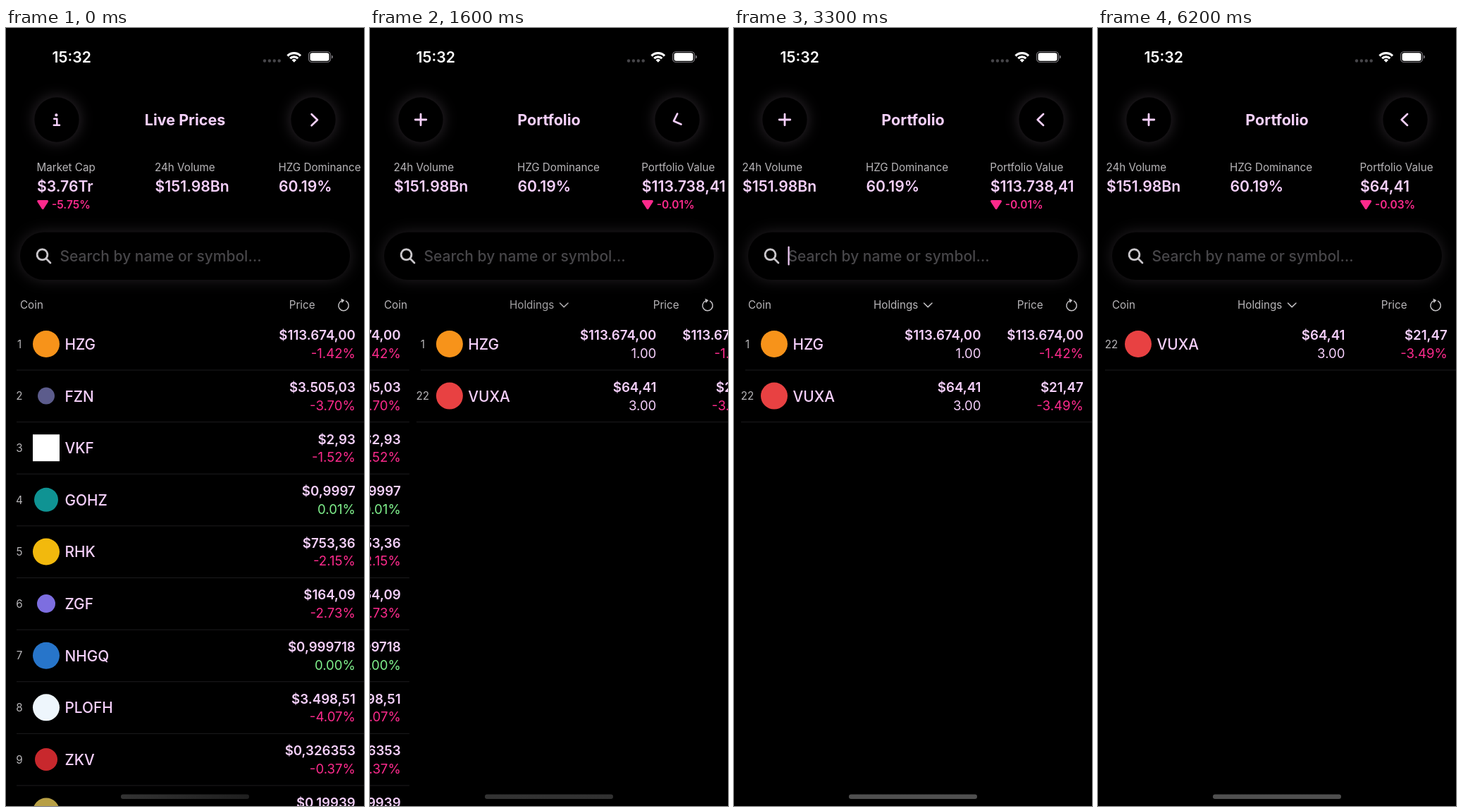
Recreate the animation shown at these times as an HTML page. Size 508x1103 px, loop 6.5 s.

```html
<!DOCTYPE html>
<html lang="en">
<head>
<meta charset="utf-8">
<title>Live prices</title>
<style>
  html, body { margin: 0; width: 100%; height: 100%; overflow: hidden; background: #000; }
  svg { display: block; width: 508px; height: 1103px; }
  text { font-family: Inter, "Liberation Sans", sans-serif; fill: #f6d0fc; white-space: pre; }
  .cap { font-size: 15.2px; fill: #b8b6b9; }
  .val { font-size: 21.2px; font-weight: 600; }
  .time { fill: #fff; }
  .chg { font-size: 15.5px; font-weight: 600; }
  .title { font-size: 21.5px; font-weight: 700; text-anchor: middle; }
  .field { font-size: 21px; font-weight: 500; }
  .name { font-size: 20.8px; font-weight: 500; }
  .price { font-size: 18.7px; font-weight: 600; text-anchor: end; }
  .pct { font-size: 18.6px; text-anchor: end; }
  .down { fill: #fd2a8c; }
  .up { fill: #80f28d; }
  .rank { text-anchor: middle; }
  .line { fill: none; stroke: #f6d0fc; stroke-linecap: round; stroke-linejoin: round; }
  .thin { stroke: #c4c2c5; stroke-width: 1.5; }
  .glow { fill: #000; filter: drop-shadow(0 0 10px rgba(255, 225, 255, .19)); }
  .bar { filter: drop-shadow(0 0 10px rgba(255, 225, 255, .14)); }
</style>
</head>
<body>
<svg viewBox="0 0 508 1103" id="stage"></svg>
<script>
const W = 508, ROW = 73.62, LOOP = 6500;

const text = (cls, x, y, s, id = '') => `<text class="${cls}" x="${x}" y="${y}" id="${id}">${s}</text>`;
const disc = (x, y, r, fill) => `<circle cx="${x}" cy="${y}" r="${r}" fill="${fill}"/>`;
const line = (d, w, id = '') => `<path class="line" d="${d}" stroke-width="${w}" id="${id}"/>`;

const tone = pct => pct[0] === '-' ? 'down' : 'up';

const icon = (shape, size, color) => shape === 'square'
  ? `<rect x="${57 - size}" y="${448 - size}" width="${size * 2}" height="${size * 2}" fill="${color}"/>`
  : disc(57, 448, size, color);

function row(i, [rank, name, price, pct, color, size = 19, shape], holding) {
  const left = !holding ? 15 : rank > 9 ? 10 : 16;
  return `<g transform="translate(0 ${i * ROW})">
    ${text('cap rank', 19, 453.7, rank)}${icon(shape, size, color)}
    ${text('name', 83.5, 456, name)}
    ${holding ? text('price', 350.5, 442.3, holding[0]) + text('pct', 350.5, 468, holding[1]) : ''}
    ${text('price', 495.8, 442.3, price)}${text('pct ' + tone(pct), 495.8, 468, pct)}
    <path d="M${left} 485H508" stroke="#1d1c1e"/></g>`;
}

function stat(x, label, value, change, id = '') {
  const tri = `<path d="M${x + 1.8} 245.6h12.8l-6.4 10z" fill="#fd2a8c" stroke="#fd2a8c" stroke-width="3" stroke-linejoin="round"/>`;
  return `<g id="${id}">${text('cap', x - .5, 202.5, label)}${text('val', x, 231.7, value)}
    ${change ? tri + text('chg down', x + 21, 256, change) : ''}</g>`;
}

const coins = [
  [1, 'HZG', '$113.674,00', '-1.42%', '#f7931a'],
  [2, 'FZN', '$3.505,03', '-3.70%', '#5c5c8c', 12],
  [3, 'VKF', '$2,93', '-1.52%', '#ffffff', 19, 'square'],
  [4, 'GOHZ', '$0,9997', '0.01%', '#0f9393', 17],
  [5, 'RHK', '$753,36', '-2.15%', '#f2b90d'],
  [6, 'ZGF', '$164,09', '-2.73%', '#7d6ee0', 13],
  [7, 'NHGQ', '$0,999718', '0.00%', '#2775ca'],
  [8, 'PLOFH', '$3.498,51', '-4.07%', '#eef6fc'],
  [9, 'ZKV', '$0,326353', '-0.37%', '#c8282d', 16],
  [10, 'QOHV', '$0,19939', '-4.20%', '#b79f45']
];
const second = [22, 'VUXA', '$21,47', '-3.49%', '#e84142'];

const statusBar = `${text('val time', 65.5, 49, '15:32')}
  ${[0, 1, 2, 3].map(i => disc(367 + i * 6.9, 46.5, 2.2, '#47464a')).join('')}
  <g fill="none" stroke="#fff" stroke-width="3.2">
    <path d="M399.5 39.5A13.2 13.2 0 0 1 418 39.5M403.2 43.2A8 8 0 0 1 414.3 43.2"/></g>
  <path d="M408.8 48.8l-3.2-3.4a4.6 4.6 0 0 1 6.4 0z" fill="#fff"/>
  <rect x="429.5" y="33.5" width="31" height="15" rx="4.8" fill="none" stroke="#77757a" stroke-width="1.2"/>
  <rect x="431.5" y="35.3" width="27" height="11.4" rx="3.2" fill="#fff"/>
  <path d="M462 38.5q2 .6 2 2.5t-2 2.5z" fill="#77757a"/>`;

const header = `<circle id="ring" cx="72" cy="130" fill="none" stroke="#fff"/>
  <circle class="glow" cx="72" cy="130" r="31.7"/><circle class="glow" cx="436" cy="130" r="31.7"/>
  <g id="info">${disc(71.4, 123.4, 2.1, '#f6d0fc')}${line('M68.2 128.7H72.3V137.8M67.8 137.8H76', 2.5)}</g>
  ${line('M64.2 130H79.8M72 122.2V137.8', 2.8, 'plus')}
  ${line('M433.6 122.3L441.9 130.2L433.6 138.2', 2.7, 'arrow')}
  ${text('title', 254, 137.6, '', 'title')}`;

const stats = `<g id="stats">
  ${stat(44, 'Market Cap', '$3.76Tr', '-5.75%')}
  ${stat(211.5, '24h Volume', '$151.98Bn')}
  ${stat(387, 'HZG Dominance', '60.19%')}
  ${stat(563.3, 'Portfolio Value', '$113.738,41', '-0.01%', 'total')}
  ${stat(571.5, 'Portfolio Value', '$64,41', '-0.03%', 'found')}</g>`;

const search = `<rect class="glow bar" x="20" y="289.5" width="468" height="67.5" rx="33.7"/>
  ${line('M57.3 327.3L63 333M51.5 313.9a7.4 7.4 0 1 0 .01 0', 2.7, 'lens')}
  ${text('field', 76.5, 331.2, '', 'field')}
  <rect id="caret" y="309.5" width="2.2" height="27" rx="1" fill="#f6d0fc"/>
  <g id="clear">${disc(447.3, 323.4, 11, '#f6d0fc')}
    <path d="M443.6 319.7l7.4 7.4m0-7.4l-7.4 7.4" stroke="#000" stroke-width="2.2" stroke-linecap="round"/></g>`;

const columns = `${text('cap', 20, 398, 'Coin')}
  <g id="holdings">${text('cap', 198, 398, 'Holdings')}<path class="line thin" d="M269.5 390L275.2 395.6L281 390"/></g>
  ${text('cap', 401.8, 398, 'Price')}
  <path class="line thin" d="M482.5 387.2A7.2 7.2 0 1 1 476.2 386.9"/>
  <path d="M475.4 383.4l5 2.7l-3.8 4z" fill="#c4c2c5"/>`;

const homeBar = `<linearGradient id="shade"><stop id="homeLeft"/><stop id="homeRight" offset="1"/></linearGradient>
  <rect x="163" y="1086.5" width="182" height="6.5" rx="3.2" fill="url(#shade)"/>`;

const $ = id => document.getElementById(id);
$('stage').innerHTML = `
  <g id="live">${coins.map((c, i) => row(i, c)).join('')}</g>
  <g id="folio"><g id="first">${row(0, coins[0], ['$113.674,00', '1.00'])}</g>
    <g id="next">${row(1, second, ['$64,41', '3.00'])}</g></g>
  ${statusBar}${header}${stats}${search}${columns}${homeBar}`;

const clamp = v => Math.min(1, Math.max(0, v));
const ramp = (t, from, to) => clamp((t - from) / (to - from));
const smooth = v => v * v * (3 - 2 * v);
const move = (id, x, y = 0) => $(id).setAttribute('transform', `translate(${x} ${y})`);
const fade = (id, v) => $(id).setAttribute('opacity', v);
const gray = (id, v) => $(id).setAttribute('stop-color', `rgb(${v},${v},${v})`);

// Critically damped spring with a 0.5 s response
function spring(ms) {
  const a = Math.max(0, ms) / 1000 * 4 * Math.PI;
  return 1 - (1 + a) * Math.exp(-a);
}

// cubic-bezier(0, 0, .58, 1), solved by bisection
function easeOut(x) {
  let lo = 0, hi = 1, u = .5;
  for (let i = 0; i < 20; i++) {
    u = (lo + hi) / 2;
    if (3 * (1 - u) * u * u * .58 + u ** 3 < x) lo = u; else hi = u;
  }
  return 3 * (1 - u) * u * u + u ** 3;
}

function typed(t) {
  if (t < 3500 || t >= 5900) return '';
  return 'Vux'.slice(0, t < 3800 ? 1 : t < 4000 ? 2 : 3);
}

function caretAlpha(t) {
  if (t < 3100 || t >= 5900) return 0;
  if (t < 4500) return 1;
  if (t < 4900) return 1 - ramp(t, 4400, 4700);
  if (t < 5500) return ramp(t, 4800, 5000);
  return 1 - ramp(t, 5400, 5700);
}

function draw(t) {
  const open = t >= 1300, p = spring(t - 1300);
  move('live', -W * p);
  move('folio', W * (1 - p));
  move('stats', -199.5 * p);
  fade('holdings', p);
  fade('info', open ? 0 : 1);
  fade('plus', open ? 1 : 0);
  $('title').textContent = open ? 'Portfolio' : 'Live Prices';
  $('arrow').setAttribute('transform', `rotate(${180 * p} 436.3 130.1)`);

  const r = easeOut(ramp(t, 1300, 2300));
  $('ring').setAttribute('r', 51.8 * r);
  $('ring').setAttribute('stroke-width', 6.5 * r);
  fade('ring', open ? 1 - r : 0);

  const filter = smooth(ramp(t, 4400, 4700));
  fade('first', 1 - filter);
  move('next', 0, -ROW * filter);
  fade('total', t < 4500 ? 1 : 0);
  fade('found', t < 4500 ? 0 : 1);

  const word = typed(t), field = $('field');
  field.textContent = word || 'Search by name or symbol…';
  field.style.fill = word ? '#f6d0fc' : '#474649';
  $('lens').style.stroke = word ? '#f6d0fc' : '#c9c6ca';
  fade('clear', word ? 1 : 0);
  $('caret').setAttribute('x', 76.5 + (word ? field.getComputedTextLength() : 0));
  fade('caret', caretAlpha(t));

  const shade = 51 + 28 * ramp(t, 3000, 3300);
  gray('homeLeft', Math.round(shade));
  gray('homeRight', Math.round(shade - 20 * (1 - p)));
}

// The picture advances ten times a second
const start = performance.now();
function tick(now) {
  draw(Math.floor(Math.max(0, now - start) % LOOP / 100) * 100);
  requestAnimationFrame(tick);
}
draw(0);
requestAnimationFrame(tick);
</script>
</body>
</html>
```
